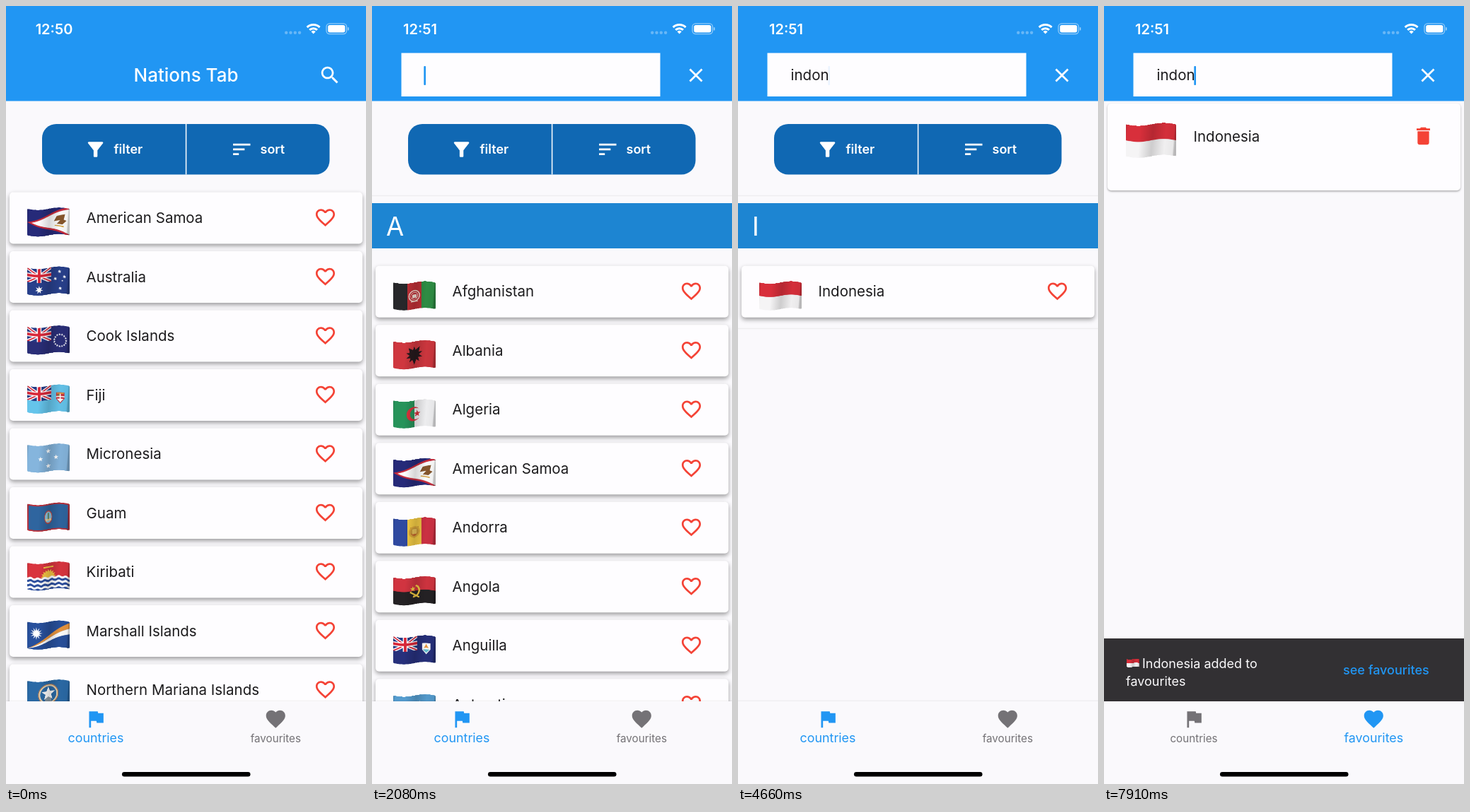
An HTML page with a canvas for the animation above (8000 ms loop, 509 px wide and 1101 px high).

```html
<!DOCTYPE html>
<html lang="en">
<head>
<meta charset="utf-8">
<title>Nations Tab</title>
<style>
html, body { margin: 0; width: 100%; height: 100%; overflow: hidden; background: #faf9fc; }
canvas { display: block; }
</style>
</head>
<body>
<canvas id="stage" width="509" height="1101"></canvas>
<script>
const LOOP = 8000;
const BLUE = '#2196f3', PAPER = '#faf9fc', CARD = '#fefdff', RED = '#f44336', INK = '#1d1c1e';
const ctx = document.getElementById('stage').getContext('2d');

const icons = {
  search: 'M15.5 14h-.79l-.28-.27C15.41 12.59 16 11.11 16 9.5 16 5.91 13.09 3 9.5 3S3 5.91 3 9.5 5.91 16 9.5 16c1.61 0 3.09-.59 4.23-1.57l.27.28v.79l5 4.99L20.49 19l-4.99-5zm-6 0C7.01 14 5 11.99 5 9.5S7.01 5 9.5 5 14 7.01 14 9.5 11.99 14 9.5 14z',
  close: 'M19 6.41L17.59 5 12 10.59 6.41 5 5 6.41 10.59 12 5 17.59 6.41 19 12 13.41 17.59 19 19 17.59 13.41 12z',
  funnel: 'M4.25 5.61C6.27 8.2 10 13 10 13v6c0 .55.45 1 1 1h2c.55 0 1-.45 1-1v-6s3.72-4.8 5.74-7.39C20.25 4.95 19.78 4 18.95 4H5.04c-.83 0-1.3.95-.79 1.61z',
  sort: 'M3 18h6v-2H3zM3 6v2h18V6zM3 13h12v-2H3z',
  flag: 'M14.4 6L14 4H5v17h2v-7h5.6l.4 2h7V6z',
  heart: 'M12 21.35l-1.45-1.32C5.4 15.36 2 12.28 2 8.5 2 5.42 4.42 3 7.5 3c1.74 0 3.41.81 4.5 2.09C13.09 3.81 14.76 3 16.5 3 19.58 3 22 5.42 22 8.5c0 3.78-3.4 6.86-8.55 11.54z',
  outline: 'M16.5 3c-1.74 0-3.41.81-4.5 2.09C10.91 3.81 9.24 3 7.5 3 4.42 3 2 5.42 2 8.5c0 3.78 3.4 6.86 8.55 11.54L12 21.35l1.45-1.32C18.6 15.36 22 12.28 22 8.5 22 5.42 19.58 3 16.5 3zm-4.4 15.55l-.1.1-.1-.1C7.14 14.24 4 11.39 4 8.5 4 6.5 5.5 5 7.5 5c1.54 0 3.04.99 3.57 2.36h1.87C13.46 5.99 14.96 5 16.5 5c2 0 3.5 1.5 3.5 3.5 0 2.89-3.14 5.74-7.9 10.05z',
  trash: 'M6 19c0 1.1.9 2 2 2h8c1.1 0 2-.9 2-2V7H6zM19 4h-3.5l-1-1h-5l-1 1H5v2h14z'
};
for (const key in icons) icons[key] = new Path2D(icons[key]);

// ---- Flags: drawn flat on a 60 x 38 field, then bent into a wave ----
const W = 60, H = 38;
let pen;
const rect = (color, x, y, w, h) => { pen.fillStyle = color; pen.fillRect(x, y, w, h); };
const disc = (color, x, y, r) => {
  pen.fillStyle = color; pen.beginPath(); pen.arc(x, y, r, 0, 7); pen.fill();
};
const ring = (color, x, y, r, width) => {
  pen.strokeStyle = color; pen.lineWidth = width; pen.beginPath(); pen.arc(x, y, r, 0, 7); pen.stroke();
};
const poly = (color, ...p) => {
  pen.fillStyle = color; pen.beginPath();
  for (let i = 0; i < p.length; i += 2) pen.lineTo(p[i], p[i + 1]);
  pen.fill();
};
const line = (color, width, x1, y1, x2, y2) => {
  pen.strokeStyle = color; pen.lineWidth = width;
  pen.beginPath(); pen.moveTo(x1, y1); pen.lineTo(x2, y2); pen.stroke();
};
const star = (color, x, y, r, tips = 5, inner = .42) => {
  const p = [];
  for (let i = 0; i < tips * 2; i++) {
    const a = i * Math.PI / tips, d = i % 2 ? r * inner : r;
    p.push(x + d * Math.sin(a), y - d * Math.cos(a));
  }
  poly(color, ...p);
};
const rows = (...c) => c.forEach((color, i) => rect(color, 0, i * H / c.length, W, H / c.length + .1));
const cols = (...c) => c.forEach((color, i) => rect(color, i * W / c.length, 0, W / c.length + .1, H));
const ensign = color => {
  rows(color);
  pen.save();
  pen.beginPath(); pen.rect(0, 0, 34, 20); pen.clip();
  rect('#263a86', 0, 0, 34, 20);
  for (const [c, w] of [['#fff', 4.5], ['#d8283a', 1.7]]) {
    line(c, w, 0, 0, 34, 20); line(c, w, 34, 0, 0, 20);
  }
  for (const [c, w] of [['#fff', 6.5], ['#d8283a', 3.8]]) {
    line(c, w, 17, 0, 17, 20); line(c, w, 0, 10, 34, 10);
  }
  pen.restore();
};
const shield = (x, y, top, bottom) => {
  poly(top, x - 6, y - 7, x + 6, y - 7, x + 6, y + 2, x, y + 9, x - 6, y + 2);
  poly(bottom, x - 5, y + 2, x + 5, y + 2, x, y + 7);
};

const flags = {
  'American Samoa'() {
    rows('#262a79');
    poly('#c92b3b', 0, 19, 60, -2, 60, 40);
    poly('#fff', 6, 19, 60, 1, 60, 37);
    poly('#87572d', 38, 19, 42, 12, 54, 9, 52, 17, 56, 18, 50, 24, 42, 23, 47, 18);
    line('#d9a441', 1.5, 39, 25, 52, 27);
  },
  'Australia'() {
    ensign('#28408c');
    star('#fff', 17, 30, 6, 7);
    for (const [x, y] of [[46, 7], [40, 17], [53, 14], [47, 31]]) star('#fff', x, y, 2.8, 7);
    star('#fff', 50, 20, 1.4);
  },
  'Cook Islands'() {
    ensign('#2a2e78');
    for (let i = 0; i < 15; i++) {
      const a = i * Math.PI * 2 / 15;
      star('#fff', 47 + 8.5 * Math.cos(a), 21 + 8.5 * Math.sin(a), 1.8);
    }
  },
  'Fiji'() {
    ensign('#65c4eb');
    shield(47, 18, '#c9333d', '#fff');
    line('#fff', 1.5, 47, 13, 47, 25); line('#fff', 1.5, 41, 17, 53, 17);
    rect('#6c9a4c', 43, 14, 3, 2); rect('#d9a441', 42, 11.5, 10, 1.5);
  },
  'Micronesia'() {
    rows('#85b5dd');
    for (const [x, y] of [[30, 9], [30, 30], [19, 19], [41, 19]]) star('#fff', x, y, 3.6);
  },
  'Guam'() {
    rows('#b8333f'); rect('#2f659f', 2, 2, 56, 34);
    pen.save(); pen.translate(30, 19); pen.scale(.6, 1);
    disc('#c5443d', 0, 0, 9.5); disc('#8cc3dc', 0, 0, 8);
    pen.restore();
    rect('#e6cf9a', 26, 21, 8, 3); line('#5a7a45', 1.5, 30, 13, 30, 22);
  },
  'Kiribati'() {
    rows('#d9353f');
    star('#f6c744', 30, 20, 11, 17, .72); disc('#f6c744', 30, 20, 7);
    line('#f6c744', 2, 23, 6, 37, 6);
    for (let i = 0; i < 6; i++) {
      pen.fillStyle = i % 2 ? '#2d4f9e' : '#fff';
      pen.beginPath(); pen.moveTo(0, H);
      for (let x = 0; x <= W; x += 2) pen.lineTo(x, 20 + i * 3.2 + Math.cos(x * .63));
      pen.lineTo(W, H); pen.fill();
    }
  },
  'Marshall Islands'() {
    rows('#28509c');
    poly('#e9953e', 0, 38, 60, 2, 60, 10);
    poly('#fff', 0, 38, 60, 10, 60, 18);
    star('#fff', 13, 15, 9, 12, .45);
  },
  'Northern Mariana Islands'() {
    rows('#2b6aa6');
    ring('#e2d2b2', 30, 19, 13, 3); ring('#b0764e', 30, 19, 14, 1);
    poly('#8c9ba5', 25, 32, 27, 14, 33, 14, 35, 32);
    star('#fff', 30, 18, 10);
  },
  'Afghanistan'() {
    cols('#27272a', '#bd2f36', '#2f8f45');
    ring('#f3dcd1', 30, 19, 7.5, 1.4); ring('#f3dcd1', 30, 19, 5, .7);
    rect('#f3dcd1', 27, 17, 6, 5); line('#f3dcd1', 1.2, 25, 27, 35, 27);
  },
  'Albania'() {
    rows('#cf373f');
    star('#26191d', 30, 19, 12, 10, .55);
    poly('#26191d', 22, 8, 30, 13, 38, 8, 36, 17, 30, 33, 24, 17);
  },
  'Algeria'() {
    cols('#27935a', '#f2f2f4');
    disc('#d9323d', 29, 19, 10); 
    pen.save(); pen.beginPath(); pen.arc(32, 19, 8, 0, 7); pen.clip();
    cols('#27935a', '#f2f2f4');
    pen.restore();
    star('#d9323d', 34, 19, 5);
  },
  'Andorra'() {
    cols('#2f49a0', '#f2ca45', '#cf3144');
    shield(30, 19, '#c8993a', '#c6682d');
    ring('#dba83a', 30, 19, 7, 2); rect('#e8c25a', 27, 15, 6, 7);
  },
  'Angola'() {
    rows('#d13440', '#252225');
    pen.strokeStyle = '#f4ca43'; pen.lineWidth = 2.4;
    pen.beginPath(); pen.arc(29, 19, 8, -1.2, 1.7); pen.stroke();
    line('#f4ca43', 2, 24, 20, 37, 29); star('#f4ca43', 28, 16, 4);
  },
  'Anguilla'() {
    ensign('#27307c');
    shield(47, 18, '#fff', '#65bfd0');
    star('#e7963c', 47, 16, 4, 3);
  },
  'Antarctica'() {
    rows('#559ccf');
    poly('#fff', 18, 9, 25, 14, 38, 9, 45, 18, 40, 28, 33, 30, 29, 25, 20, 24);
  },
  'Antigua and Barbuda'() {
    rows('#d0303d');
    poly('#26262a', 0, 0, 60, 0, 47, 17, 13, 17);
    star('#f5c843', 30, 17, 10, 14, .65);
    poly('#2f72b5', 13, 17, 47, 17, 41, 25, 19, 25); poly('#fff', 19, 25, 41, 25, 30, 38);
  },
  'Argentina'() { rows('#78b5e2', '#fff', '#78b5e2'); star('#eab544', 30, 19, 5, 12, .6); },
  'Bahrain'() {
    rows('#d0303d'); rect('#fff', 0, 0, 18, H);
    for (let i = 0; i < 5; i++) poly('#fff', 18, i * 7.6, 26, i * 7.6 + 3.8, 18, i * 7.6 + 7.6);
  },
  'Benin'() { rows('#f4cd45', '#d93843'); rect('#278b57', 0, 0, 24, H); },
  'Bosnia and Herzegovina'() {
    rows('#2a3f8e'); poly('#f4ca43', 17, 0, 50, 0, 50, 38);
    for (let i = 0; i < 7; i++) star('#fff', 12 + i * 5.4, 1 + i * 6, 2.8);
  },
  'British Indian Ocean Territory'() {
    rows('#fff', '#3055a3', '#fff', '#3055a3', '#fff', '#3055a3', '#fff');
    pen.save(); pen.globalCompositeOperation = 'destination-over'; pen.restore();
    rect('#263a86', 0, 0, 30, 18);
    for (const [c, w] of [['#fff', 5], ['#d8283a', 3]]) { line(c, w, 15, 0, 15, 18); line(c, w, 0, 9, 30, 9); }
    line('#796344', 2, 45, 13, 45, 29); star('#4e8b4b', 45, 13, 7, 7);
  },
  'Burkina Faso'() { rows('#d8323e', '#27955a'); star('#f4ca43', 30, 19, 7); },
  'India'() { rows('#f2973e', '#fff', '#328b48'); ring('#2b3f8f', 30, 19, 4.5, 1); star('#2b3f8f', 30, 19, 4, 12, .2); },
  'Indonesia'() { rows('#d82f3b', '#f5f4f5'); }
};

const layer = () => {
  const c = document.createElement('canvas');
  c.width = 120; c.height = 88;
  return c;
};
const waved = {};
function makeFlag(name) {
  const flat = layer(), out = layer(), to = out.getContext('2d');
  pen = flat.getContext('2d');
  pen.scale(2, 2);
  pen.beginPath(); pen.roundRect(0, 0, W, H, 1.5); pen.clip();
  flags[name]();
  for (let i = 0; i < 120; i++)
    to.drawImage(flat, i, 0, 1, 76, i, 5 + 3.6 * Math.sin(i / 60 * Math.PI), 1, 76);
  const shade = to.createLinearGradient(0, 0, 120, 10);
  [[0, .18], [.05, 0], [.3, 0], [.55, .16], [.8, .02], [.97, .05], [1, .25]]
    .forEach(([at, a]) => shade.addColorStop(at, `rgba(0,0,0,${a})`));
  to.globalCompositeOperation = 'source-atop';
  to.fillStyle = shade;
  to.fillRect(0, 0, 120, 88);
  return out;
}
function flag(name, x, y, width) {
  waved[name] ??= makeFlag(name);
  ctx.drawImage(waved[name], x, y, width, width * 88 / 120);
}

// ---- Lists ----
const oceania = ['American Samoa', 'Australia', 'Cook Islands', 'Fiji', 'Micronesia', 'Guam',
  'Kiribati', 'Marshall Islands', 'Northern Mariana Islands'];
const sorted = ['Afghanistan', 'Albania', 'Algeria', 'American Samoa', 'Andorra', 'Angola', 'Anguilla',
  'Antarctica', 'Antigua and Barbuda', 'Argentina', 'Bahrain', 'Benin', 'Bosnia and Herzegovina',
  'British Indian Ocean Territory', 'Burkina Faso', 'India', 'Indonesia'];

// ---- Timeline ----
const SORTED = 500, SEARCH = 1830, LIKED = 6080, TAB = 7160;
const keys = [[2580, 'i'], [2830, 'in'], [3080, 'ind'], [3250, 'indo'], [3500, 'indon']];

const clamp = v => Math.min(1, Math.max(0, v));
const easeOut = v => 1 - (1 - clamp(v)) ** 2;
const smooth = v => { v = clamp(v); return v < .4 ? 2.2 * v * v : 1 - (1 - v) ** 3 * 3; };

// ---- Drawing helpers ----
function box(color, x, y, w, h, r = 0) {
  ctx.fillStyle = color;
  ctx.beginPath(); ctx.roundRect(x, y, w, h, r); ctx.fill();
}
function text(str, x, y, size, color, weight = 400, align = 'left') {
  ctx.font = `${weight} ${size}px Inter, sans-serif`;
  ctx.fillStyle = color;
  ctx.textAlign = align;
  ctx.fillText(str, x, y);
}
function icon(name, x, y, color) {
  ctx.save();
  ctx.translate(x, y);
  ctx.scale(1.357, 1.357);
  ctx.fillStyle = color;
  ctx.fill(icons[name]);
  ctx.restore();
}
function ripple(x, y, age, length, rgb, strength) {
  if (age < 0 || age > length) return;
  const alpha = strength * clamp(age / 80) * clamp((length - age) / 250);
  ctx.fillStyle = `rgba(${rgb},${alpha})`;
  ctx.beginPath(); ctx.arc(x, y, 45, 0, 7); ctx.fill();
}
function card(y, h, shadow, drop = 3) {
  ctx.save();
  ctx.shadowColor = `rgba(0,0,0,${shadow})`;
  ctx.shadowBlur = drop * 2;
  ctx.shadowOffsetY = drop;
  box(CARD, 5, y, 499, h, 5);
  ctx.restore();
}
function row(name, y, t) {
  const liked = t >= LIKED;
  card(y, 73, .38 * (1 - clamp((t - LIKED) / 200)));
  flag(name, 30, y + 21, 59.5);
  text(name, 113.5, y + 43.5, 20.5, INK);
  ripple(451.5, y + 36.5, t - LIKED + 80, 450, '120,120,120', .12);
  icon(liked ? 'heart' : 'outline', 435.2, y + 19.6, RED);
}

function countries(t, query) {
  box('#1068b3', 51, 167, 406.5, 71.5, 20);
  box('#f4f8fc', 253.8, 167, 1.6, 71.5);
  icon('funnel', 110.3, 186.7, '#fff');
  text('filter', 152.5, 208.5, 18, '#fff', 600);
  icon('sort', 317, 186.6, '#fff');
  text('sort', 359.5, 208.5, 18, '#fff', 600);
  if (t < SORTED) {
    oceania.forEach((name, i) => row(name, 263.5 + i * 83.5, t));
    return;
  }
  const found = sorted.filter(name => name.toLowerCase().includes(query));
  let y = 268.5;
  for (const letter of new Set(found.map(name => name[0]))) {
    box('#eeedf0', 0, y - .7, 509, 1.4);
    box('#1d85d2', 0, y + 10.5, 509, 64);
    text(letter, 20, y + 56.5, 36.5, '#fff');
    const group = found.filter(name => name[0] === letter);
    group.forEach((name, i) => row(name, y + 99.3 + i * 83.5, t));
    y += 104.5 + group.length * 83.5;
  }
  box('#eeedf0', 0, y - .7, 509, 1.4);
}

function favourites() {
  card(138, 123, .32, 1.4);
  flag('Indonesia', 30.5, 164.5, 71.5);
  text('Indonesia', 126.5, 191.5, 20.5, INK);
  icon('trash', 435.2, 167.8, RED);
}

function snackbar(t) {
  const p = (t - LIKED) / 250;
  if (p <= 0) return;
  ctx.save();
  ctx.translate(0, 984 - 89 * smooth(p));
  box('#323033', 0, 0, 509, 89);
  ctx.globalAlpha = clamp((p - .4) / .6);
  flag('Indonesia', 32, 28.5, 17.5);
  text('Indonesia added to', 54, 42, 18, '#fbfafc');
  text('favourites', 31, 66.5, 18, '#fbfafc');
  text('see favourites', 338, 50.5, 18, BLUE, 500);
  ctx.restore();
}

function cursorAlpha(t, since) {
  const p = t - since - 150;
  if (p < 500) return 1;
  const fade = easeOut(p % 500 / 250);
  return Math.floor(p / 500) % 2 ? 1 - fade : fade;
}

function statusBar(t) {
  text(t < SORTED ? '12:50' : '12:51', 68, 39.5, 20, '#fff', 600, 'center');
  for (let i = 0; i < 4; i++) box('rgba(255,255,255,.32)', 394 + i * 6.3, 35.5, 4.4, 4.4, 2.2);
  ctx.strokeStyle = '#fff';
  for (const [r, w] of [[2.3, 4.6], [7.8, 3], [13, 3]]) {
    ctx.lineWidth = w;
    ctx.beginPath(); ctx.arc(434.6, 39.5, r, -2.33, -.81); ctx.stroke();
  }
  ctx.strokeStyle = 'rgba(255,255,255,.5)';
  ctx.lineWidth = 1.3;
  ctx.beginPath(); ctx.roundRect(453, 24.8, 28.6, 14.8, 4.5); ctx.stroke();
  box('#fff', 455.2, 27, 24.2, 10.4, 2.6);
  box('rgba(255,255,255,.5)', 483, 30, 1.8, 4.6, 1);
}

function appBar(t, query, since) {
  box(BLUE, 0, 0, 509, 134.5);
  statusBar(t);
  if (t < SEARCH) {
    text('Nations Tab', 254.5, 106.5, 26, '#fff', 500, 'center');
    icon('search', 441.7, 81.6, '#fff');
  } else {
    box(CARD, 41.5, 66.5, 366, 61.5);
    text(query, 74.5, 105, 20.5, INK);
    const x = 73.3 + (query ? ctx.measureText(query).width : 0);
    ctx.globalAlpha = cursorAlpha(t, since);
    box(BLUE, x, 85, 2.7, 27, 1);
    ctx.globalAlpha = 1;
    icon('close', 441.7, 81.7, '#fff');
  }
  ripple(458, 97.5, t - 1660, 420, '200,200,200', .4);
}

function tab(label, shape, x, active) {
  const mix = (a, b) => a + (b - a) * active;
  const color = `rgb(${mix(116, 33)},${mix(114, 150)},${mix(118, 243)})`;
  icon(shape, x - 16.3, 992.7, color);
  text(label, x, 1042.3 - active * .6, mix(15.2, 17.85), color, 400, 'center');
}

function navBar(t) {
  const on = easeOut((t - TAB) / 200);
  ripple(381, 1021, t - 7010, 650, '0,0,0', .025);
  tab('countries', 'flag', 127, 1 - on);
  tab('favourites', 'heart', 381.3, on);
  box('#000', 164, 1084, 181.5, 6.5, 3.25);
}

function draw(t) {
  const [since, query] = keys.findLast(([at]) => t >= at) ?? [SEARCH + 20, ''];
  box(PAPER, 0, 0, 509, 1101);
  navBar(t);
  ctx.save();
  ctx.beginPath(); ctx.rect(0, 134, 509, 850); ctx.clip();
  box(PAPER, 0, 134, 509, 850);
  if (t < TAB) countries(t, query); else favourites();
  box('rgba(0,0,0,.04)', 0, 982.5, 509, 1.5);
  snackbar(t);
  ctx.restore();
  appBar(t, query, since);
}

function tick() {
  draw(performance.now() % LOOP);
  requestAnimationFrame(tick);
}
tick();
</script>
</body>
</html>
```
